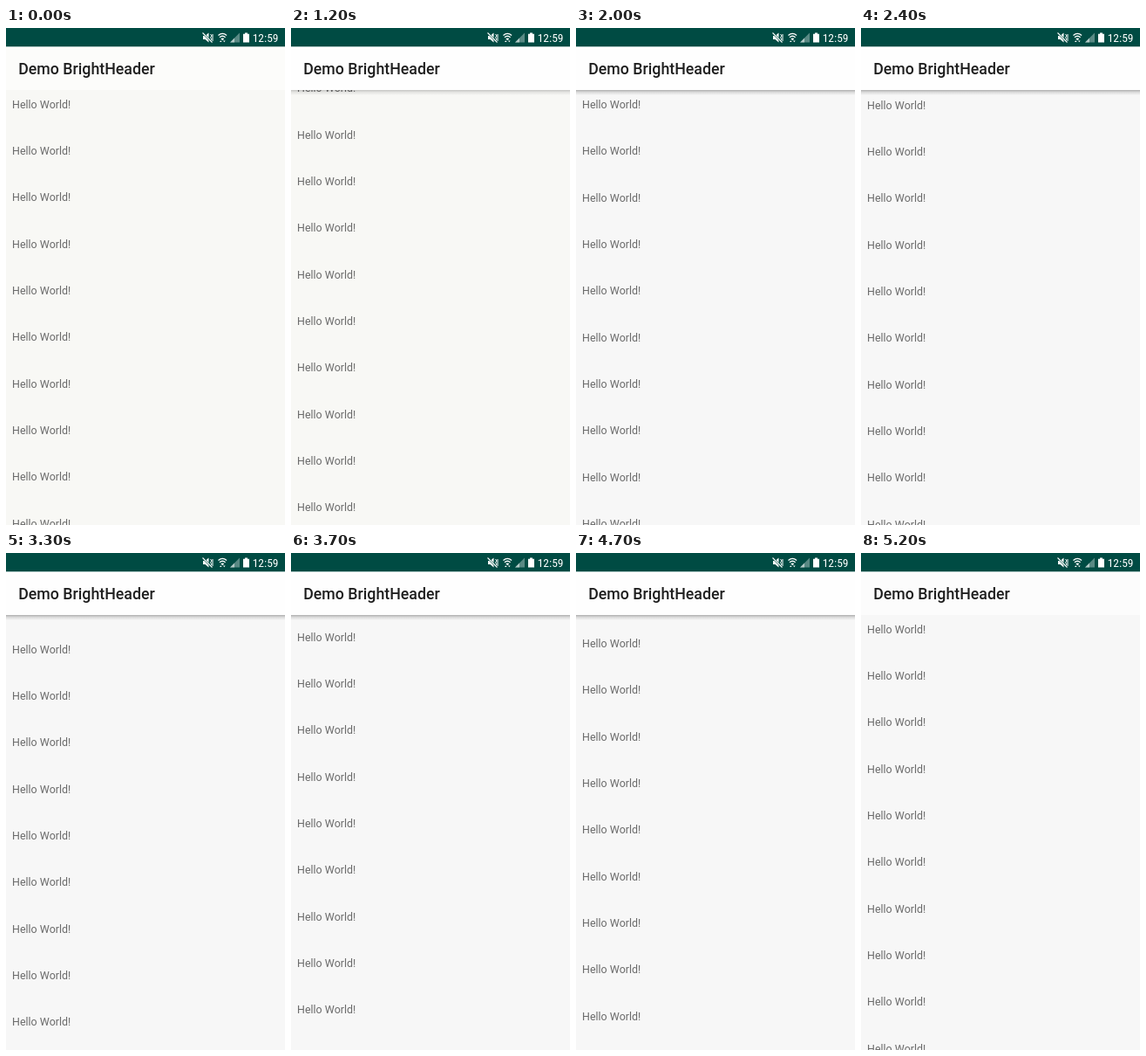
Recreate the animation shown at these times as an HTML page. Size 320x569 px, loop 5400 ms.

```html
<!DOCTYPE html>
<html lang="en">
<head>
<meta charset="utf-8">
<title>Toolbar with scroll shadow</title>
<style>
  html, body { margin: 0; width: 100%; height: 100%; overflow: hidden; }
  svg { display: block; width: 100%; height: 100%; }
  text { font-family: Roboto, sans-serif; }
  #rows { font-size: 12.44px; fill: #6b6b6b; }
  #title { font-size: 17.78px; font-weight: 500; fill: #1f1f1f; }
  #clock { font: 13.5px "Roboto Condensed", Roboto, sans-serif; font-stretch: 75%; text-anchor: end; }
</style>
</head>
<body>
<svg viewBox="0 0 320 569">
  <defs>
    <linearGradient id="fade" x2="0" y2="1">
      <stop stop-opacity=".3"/>
      <stop offset=".4" stop-opacity=".12"/>
      <stop offset="1" stop-opacity="0"/>
    </linearGradient>
  </defs>
  <rect id="page" width="320" height="569"/>
  <g id="rows"></g>
  <rect id="shadow" y="71" width="320" height="6" fill="url(#fade)"/>
  <rect id="bar" y="21" width="320" height="50"/>
  <text id="title" x="14.2" y="53.2">Demo BrightHeader</text>

  <rect width="320" height="21.3" fill="#004b43"/>
  <g fill="#fff">
    <!-- muted speaker -->
    <path d="M226 9h2.5l4-3.5v11l-4-3.500h-2.500z"/>
    <path d="M234.500 7l1.500 2-1.500 2 1.500 2-1.500 2M237 7v8" fill="none" stroke="#fff"/>
    <path d="M225.500 5.500l11 11" stroke="#004b43" stroke-width="2.400"/>
    <path d="M225.500 5.500l11 11" stroke="#fff" stroke-width="1.100"/>
    <!-- wifi -->
    <path d="M243.500 8.500q4.800-4.300 9.600 0M245 10.800q3.300-3 6.600 0" fill="none" stroke="#fff" stroke-width="1.300"/>
    <path d="M246.300 12.300q2-1.500 4 0l-2 2zM245 16l1.300-1.800 1.300 1.800zM249 14.500h2.600l-1.300 1.800z"/>
    <!-- signal -->
    <path d="M268 5.500v11h-11z" opacity=".35"/>
    <path d="M262 11.500v5h-5z" opacity=".55"/>
    <!-- battery -->
    <path d="M274 5.500h3v1.300h2v9.700h-7v-9.700h2z"/>
    <text id="clock" x="312.500" y="16">12:59</text>
  </g>
</svg>
<script>
const LOOP = 5400, STEP = 100, PITCH = 160 / 3;
const el = id => document.getElementById(id);

// [time in ms, scroll distance in px]
const scrollKeys = [
  [1100, 0], [1200, 18.3], [1700, 222.3], [1800, 250], [1900, 262], [2000, 266],
  [2100, 266], [2200, 284], [2400, 372.3], [2700, 480],
  [3200, 480], [3700, 364.3], [4300, 210.3], [5000, 0]
];
const shadowKeys = [[1100, 0], [1200, .7], [1300, 1], [5000, 1], [5100, .5], [5200, 0]];

function valueAt(keys, t) {
  const next = keys.findIndex(key => key[0] >= t);
  if (next === 0) return keys[0][1];
  if (next < 0) return keys[keys.length - 1][1];
  const [t0, v0] = keys[next - 1], [t1, v1] = keys[next];
  return v0 + (v1 - v0) * (t - t0) / (t1 - t0);
}

for (let i = 0; i < 11; i++) {
  el('rows').innerHTML += `<text x="7.1" y="${91.5 + i * PITCH}">Hello World!</text>`;
}

function draw(now) {
  const t = Math.floor(now % LOOP / STEP) * STEP;
  const shadow = valueAt(shadowKeys, t);
  const warm = t < 1400;
  el('rows').setAttribute('transform', `translate(0 ${-(valueAt(scrollKeys, t) % PITCH)})`);
  el('shadow').setAttribute('opacity', shadow);
  el('page').setAttribute('fill', warm ? '#f8f8f5' : '#f7f7f7');
  el('bar').setAttribute('fill', shadow > .6 ? '#fefefe' : warm ? '#fcfcfa' : '#fcfcfc');
}

const start = performance.now();
function tick() {
  draw(performance.now() - start);
  requestAnimationFrame(tick);
}
tick();
</script>
</body>
</html>
```
